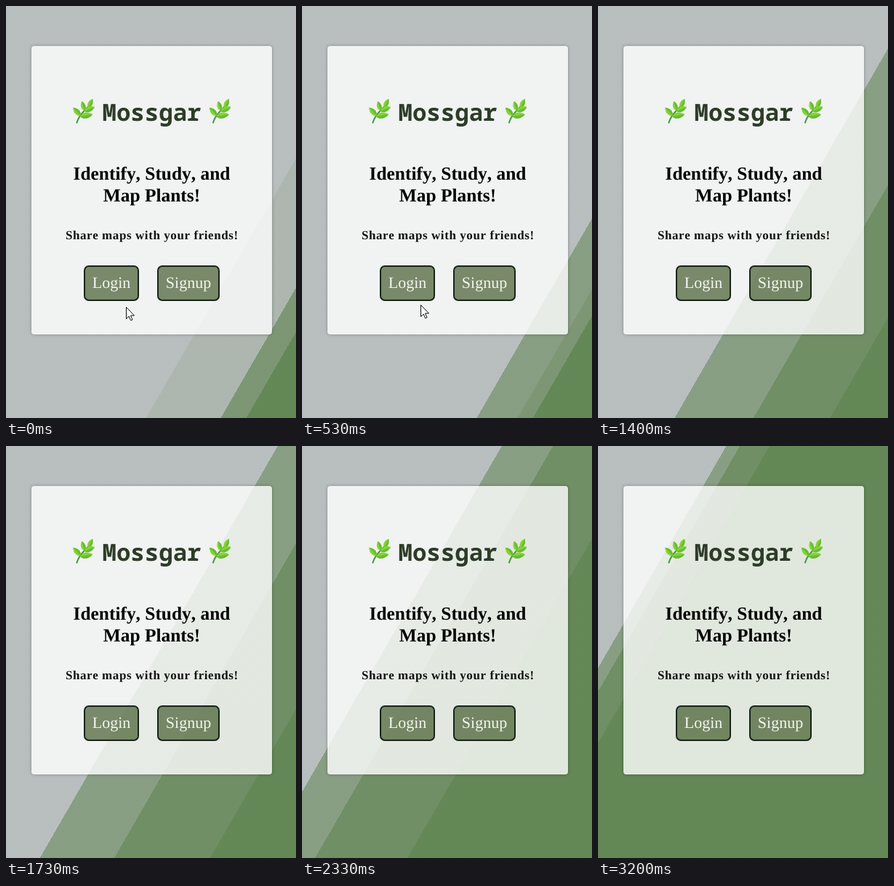
An HTML page that plays this animation: 399 px wide and 567 px high, repeating every 3.27 s.

```html
<!DOCTYPE html>
<html lang="en">
<head>
<meta charset="utf-8">
<title>Mossgar</title>
<style>
  html, body { margin: 0; width: 100%; height: 100%; overflow: hidden; background: #fff; }
  .stage { position: relative; width: 399px; height: 567px; overflow: hidden; }
  .slope {
    position: absolute; top: 0; left: -700px; width: 1400px; height: 567px;
    opacity: .5;
    background: linear-gradient(-60deg, #4e763f 50%, #aeb5b5 50%);
  }
  .card {
    position: absolute; left: 35px; top: 55px; width: 331px; height: 397px;
    border-radius: 4px;
    background: rgba(255, 255, 255, .8);
    box-shadow: 0 0 4px rgba(0, 0, 0, .3);
  }
  svg { position: absolute; left: 0; top: 0; }
  text {
    font-family: "Liberation Serif", "Times New Roman", serif;
    text-anchor: middle; font-kerning: none; text-rendering: geometricPrecision;
  }
  .title { font: bold 32.4px "Noto Sans Mono", monospace; fill: #2d3c28; }
  .lead { font-weight: bold; font-size: 25.4px; }
  .note { font-weight: bold; font-size: 17px; letter-spacing: .58px; fill: #111; }
  .button rect { fill: rgba(43, 69, 15, .6); }
  .button .rim { fill: none; stroke: #15251a; stroke-width: 2; }
  .button text { font-size: 22px; fill: #f3f5f1; }
</style>
</head>
<body>
<div class="stage">
  <div class="slope"></div>
  <div class="slope"></div>
  <div class="slope"></div>
  <div class="card"></div>
  <svg width="399" height="567" viewBox="0 0 399 567">
    <defs>
      <g id="leaf">
        <path d="M0 0C-5.500-4-4.500-11 0-16C4.500-11 5.500-4 0 0" fill="#86d42f"/>
        <path d="M0 0C5.500-4 4.500-11 0-16z" fill="#66bb38"/>
      </g>
      <g id="sprig">
        <path d="M6.500 34.500Q9 26 16 19T26 7" fill="none" stroke="#4d9c48" stroke-width="2.200" stroke-linecap="round"/>
        <use href="#leaf" transform="translate(22 14) rotate(26) scale(.85)"/>
        <use href="#leaf" transform="translate(17 18) rotate(-16) scale(.85)"/>
        <use href="#leaf" transform="translate(11.500 25) rotate(-42) scale(.95)"/>
        <use href="#leaf" transform="translate(17 19) rotate(66) scale(.95)"/>
        <use href="#leaf" transform="translate(11 26) rotate(80) scale(1.100)"/>
      </g>
    </defs>

    <use href="#sprig" x="91" y="126"/>
    <text class="title" x="200.500" y="158">Mossgar</text>
    <use href="#sprig" x="278.500" y="126"/>

    <text class="lead" x="200.500" y="239">Identify, Study, and</text>
    <text class="lead" x="200.500" y="269">Map Plants!</text>
    <text class="note" x="200.800" y="321">Share maps with your friends!</text>

    <g class="button">
      <rect x="108" y="358" width="74" height="47" rx="6"/>
      <rect class="rim" x="108" y="358" width="74" height="47" rx="6"/>
      <text x="145" y="388">Login</text>
    </g>
    <g class="button">
      <rect x="209" y="358" width="84" height="47" rx="6"/>
      <rect class="rim" x="209" y="358" width="84" height="47" rx="6"/>
      <text x="251" y="388">Signup</text>
    </g>

    <path id="cursor" d="M.5.5V16.500L4.200 13L6.700 18.700L9 17.700L6.500 12H11.500z" fill="#fff" stroke="#111" stroke-width="1"/>
  </svg>
</div>
<script>
  const LOOP = 3270, STEP = 200 / 3, LAST = 48;
  const RIGHT = 331, TRAVEL = 514;          // edge position along the stage bottom
  const HALF_RISE = 283.5 / Math.sqrt(3);   // from the bottom row to mid height

  // back to front: sweep time and the moment of turning at the far right
  const sweeps = [
    { time: 3000, turn: 1078 },
    { time: 4000, turn: 78 },
    { time: 5000, turn: -922 }
  ];
  const slopes = document.querySelectorAll('.slope');
  const cursor = document.getElementById('cursor');

  // cubic-bezier(.42, 0, .58, 1)
  function easeInOut(u) {
    let s = u;
    for (let i = 0; i < 8; i++) {
      const x = ((.52 * s - .78) * s + 1.26) * s;
      s -= (x - u) / ((1.56 * s - 1.56) * s + 1.26);
    }
    return s * s * (3 - 2 * s);
  }

  function cursorAt(t) {
    if (t <= 540) return [165 - 2 * t / 533, 414 - 3 * t / 533];
    const u = ((t - 533) / 370) ** 2;
    return [163 - 85 * u, 411 + 160 * u];
  }

  function draw(now) {
    // the scene advances at 15 pictures a second
    const t = Math.min(LAST, Math.floor((now % LOOP + 4) / STEP)) * STEP;
    sweeps.forEach(({ time, turn }, i) => {
      const edge = RIGHT - TRAVEL * easeInOut(Math.abs(t - turn) / time);
      slopes[i].style.transform = `translateX(${edge + HALF_RISE}px)`;
    });
    const [x, y] = cursorAt(t);
    cursor.setAttribute('transform', `translate(${Math.round(x)} ${Math.round(y)})`);
  }

  const start = performance.now();
  function tick() {
    draw(performance.now() - start);
    requestAnimationFrame(tick);
  }
  tick();
</script>
</body>
</html>
```
